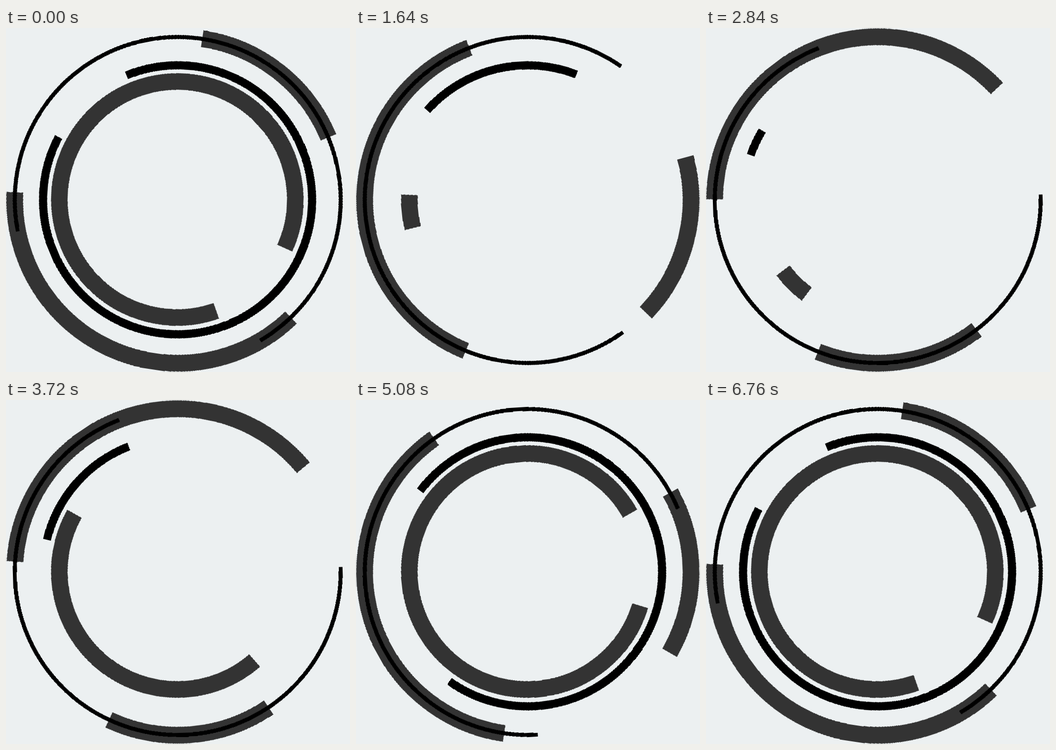
An HTML page without scripts for the animation above (6800 ms loop, 648x648 px).

```html
<!DOCTYPE html>
<html lang="en">
<head>
<meta charset="utf-8">
<title>Swinging rings</title>
<style>
html, body { margin: 0; width: 100%; height: 100%; overflow: hidden; background: #ecf0f1; }
svg { display: block; width: 100vw; height: 100vh; }
circle {
  fill: none;
  transform-box: fill-box;
  transform-origin: center;
  animation: 6.8s linear infinite;
}
.grey { stroke: #333; }
.black { stroke: #000; }

/* rotate sets the rest pose; the animated transform swings around it */
#band { rotate: -81.4deg; stroke-width: 31.5; stroke-dasharray: 58.8 68.7 136.6 95.9; animation-name: band; }
#line { rotate: 168.9deg; stroke-width: 7.6; stroke-dasharray: 250.7 109.3; animation-name: line; }
#ring { rotate: 247.6deg; stroke-width: 15.3; stroke-dasharray: 320.3 360; animation-name: ring-turn, ring-trim; }
#core { rotate: 47.55deg; stroke-width: 31.2; stroke-dasharray: 313.7 360; stroke-dashoffset: -23.15; animation-name: core-turn, core-trim; }

@keyframes band {
  0% { transform: rotate(0deg); animation-timing-function: cubic-bezier(.333, 0, .667, .069); }
  11.176% { transform: rotate(6.8deg); animation-timing-function: cubic-bezier(.333, .123, .667, .679); }
  24.118% { transform: rotate(66.2deg); animation-timing-function: cubic-bezier(.333, .383, .667, .729); }
  41.765% { transform: rotate(134.1deg); animation-timing-function: cubic-bezier(.333, .529, .667, 1); }
  48.824% { transform: rotate(148deg); animation-timing-function: cubic-bezier(.333, 0, .667, .555); }
  64.706% { transform: rotate(94.6deg); animation-timing-function: cubic-bezier(.333, .354, .667, .732); }
  74.706% { transform: rotate(52.3deg); animation-timing-function: cubic-bezier(.333, .462, .667, .686); }
  90% { transform: rotate(14.8deg); animation-timing-function: cubic-bezier(.333, .384, .667, .774); }
  95.882% { transform: rotate(3deg); animation-timing-function: cubic-bezier(.333, .533, .667, 1); }
  99.412%, 100% { transform: rotate(0deg); }
}
@keyframes line {
  0% { transform: rotate(0deg); animation-timing-function: cubic-bezier(.333, 0, .667, .666); }
  24.118% { transform: rotate(-114.6deg); animation-timing-function: cubic-bezier(.333, .498, .667, .815); }
  41.765% { transform: rotate(-170.8deg); animation-timing-function: cubic-bezier(.333, .496, .667, 1); }
  49.515% { transform: rotate(-180deg); animation-timing-function: cubic-bezier(.333, 0, .667, .577); }
  64.706% { transform: rotate(-126.3deg); }
  74.706% { transform: rotate(-82.5deg); animation-timing-function: cubic-bezier(.333, .331, .667, .799); }
  90% { transform: rotate(-13.4deg); animation-timing-function: cubic-bezier(.333, .637, .667, 1); }
  99.412%, 100% { transform: rotate(0deg); }
}
@keyframes ring-turn {
  0% { transform: rotate(0deg); }
  24.118% { transform: rotate(-26deg); }
  41.765% { transform: rotate(-48.3deg); }
  49.515% { transform: rotate(-59.5deg); }
  64.706% { transform: rotate(-43.2deg); }
  74.706% { transform: rotate(-30.7deg); }
  90% { transform: rotate(-11.3deg); }
  99.412%, 100% { transform: rotate(0deg); }
}
@keyframes ring-trim {
  0% { stroke-dasharray: 320.3 360; animation-timing-function: cubic-bezier(.333, .13, .667, .793); }
  24.118% { stroke-dasharray: 69.8 360; animation-timing-function: cubic-bezier(.333, .654, .667, 1); }
  41.765% { stroke-dasharray: 11.7 360; }
  49.515% { stroke-dasharray: 11.7 360; animation-timing-function: cubic-bezier(.333, .122, .667, .695); }
  64.706% { stroke-dasharray: 181.3 360; animation-timing-function: cubic-bezier(.333, .39, .667, .74); }
  74.706% { stroke-dasharray: 268.4 360; animation-timing-function: cubic-bezier(.333, .667, .667, 1); }
  90%, 100% { stroke-dasharray: 320.3 360; }
}
@keyframes core-turn {
  0% { transform: rotate(0deg); }
  24.118% { transform: rotate(-53.4deg); }
  41.765% { transform: rotate(-92.65deg); }
  49.515% { transform: rotate(-110deg); }
  64.706% { transform: rotate(-76.1deg); }
  74.706% { transform: rotate(-53.85deg); }
  90% { transform: rotate(-18.85deg); }
  99.412%, 100% { transform: rotate(0deg); }
}
/* offset keeps the arc centred while both ends close in */
@keyframes core-trim {
  0% { stroke-dasharray: 313.7 360; stroke-dashoffset: -23.15; animation-timing-function: ease; }
  18.235%, 49.515% { stroke-dasharray: 16.3 360; stroke-dashoffset: -171.85; animation-timing-function: ease; }
  67.75%, 100% { stroke-dasharray: 313.7 360; stroke-dashoffset: -23.15; }
}
</style>
</head>
<body>
<svg viewBox="0 0 648 648" shape-rendering="crispEdges">
  <circle id="band" class="grey" cx="323.7" cy="324" r="307.4" pathLength="360"/>
  <circle id="core" class="grey" cx="322.7" cy="323.1" r="222.2" pathLength="360"/>
  <circle id="ring" class="black" cx="323.2" cy="323.6" r="253.4" pathLength="360"/>
  <circle id="line" class="black" cx="323.5" cy="324" r="307" pathLength="360"/>
</svg>
</body>
</html>
```
